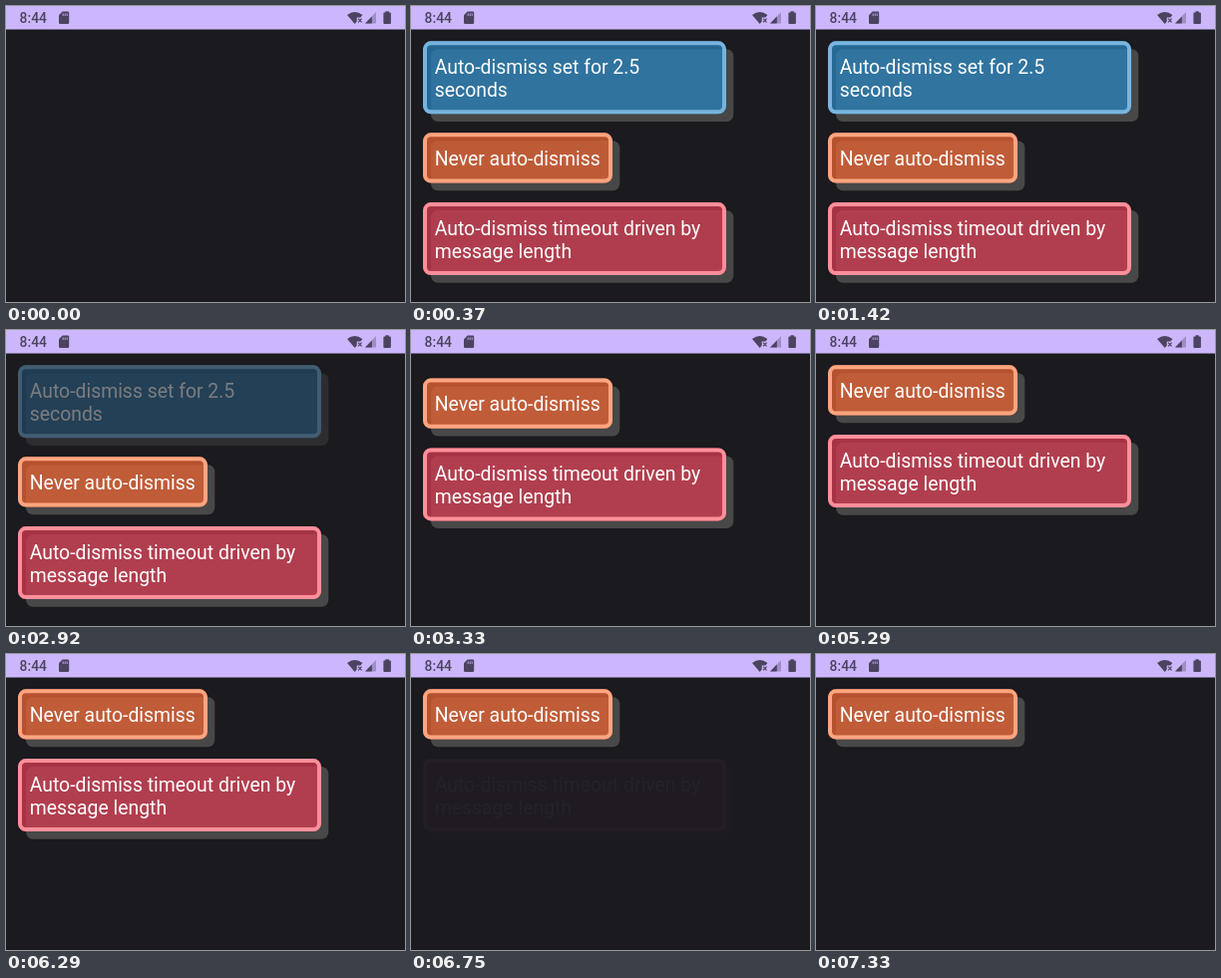
These frames come from a looping animation (400x297 px, 7420 ms). An HTML page:

```html
<!DOCTYPE html>
<html lang="en">
<head>
<meta charset="utf-8">
<title>Auto-dismissing toasts</title>
<style>
  html, body { margin: 0; width: 100%; height: 100%; overflow: hidden; background: #1a1a1f; }
  svg { display: block; width: 100%; height: 100%; }
  text { font-family: Roboto, sans-serif; }
</style>
</head>
<body>
<svg id="stage" viewBox="0 0 400 297">
  <rect width="400" height="297" fill="#1a1a1f"/>
  <g id="toasts"></g>
  <rect width="400" height="23.5" fill="#cdb7fc"/>
  <g fill="#4b4360">
    <text x="13.6" y="17" font-size="13.9" font-weight="500">8:44</text>
    <path d="M56.6 5.5H62a1.2 1.2 0 0 1 1.2 1.2V16.8A1.2 1.2 0 0 1 62 18H54.2A1.2 1.2 0 0 1 53 16.8V9.2Z"/>
    <path d="M57.2 7.4V10M59.2 7.4V10M61.2 7.4V10" stroke="#cdb7fc" stroke-width=".8"/>
    <path d="M342 9Q349.700 2.800 357.400 9L355.400 11.500H351.700V15.600L349.700 18Z"/>
    <path d="M353 12.600L356.600 16.400M356.600 12.600L353 16.400" stroke="#4b4360" stroke-width="1.200"/>
    <path d="M371 6V17.500H360Z" opacity=".35"/>
    <path d="M366.800 10.400V17.500H360Z"/>
    <path d="M380.500 6.500V5.200H383.800V6.500H385A.9 .9 0 0 1 385.900 7.400V17.100A.9 .9 0 0 1 385 18H379.300A.9 .9 0 0 1 378.400 17.100V7.400A.9 .9 0 0 1 379.300 6.500Z"/>
  </g>
</svg>
<script>
const LOOP = 7420;
const ENTER = 20;
const COLLAPSE = 3160;
const ROW_SHIFT = 92;
const LINE = 22.8;

const toasts = [
  { y: 35.3, width: 304, fill: '#2883bd', border: '#79b5df', leave: 2825, removed: COLLAPSE,
    lines: ['Auto-dismiss set for 2.5', 'seconds'] },
  { y: 127.3, width: 190, fill: '#e86333', border: '#ffa580', shifts: true,
    lines: ['Never auto-dismiss'] },
  { y: 197.1, width: 304, fill: '#d53b50', border: '#ff8f9a', leave: 6490, removed: 6850, shifts: true,
    lines: ['Auto-dismiss timeout driven by', 'message length'] }
];

function add(parent, tag, attrs, content = '') {
  const node = document.createElementNS('http://www.w3.org/2000/svg', tag);
  for (const key in attrs) node.setAttribute(key, attrs[key]);
  node.textContent = content;
  return parent.appendChild(node);
}

const layer = document.getElementById('toasts');
for (const toast of toasts) {
  const { width, fill, border, lines } = toast;
  const height = 27.4 + lines.length * LINE;
  const group = toast.group = add(layer, 'g', {});
  add(group, 'rect', { x: 20, y: 8, width: width - 0.7, height: height - 0.3, rx: 7, fill: '#484848' });
  // The translucent fill lets the offset shadow show through.
  add(group, 'rect', { x: 12, width, height, rx: 8, fill, 'fill-opacity': 0.75 });
  add(group, 'rect', { x: 14, y: 2, width: width - 4, height: height - 4, rx: 6,
    fill: 'none', stroke: border, 'stroke-width': 4 });
  lines.forEach((line, i) => add(group, 'text',
    { x: 23.7, y: 32.9 + i * LINE, 'font-size': 19.4, fill: '#fff' }, line));
}

// Remaining distance of a critically damped spring.
function spring(ms) {
  const x = Math.max(0, ms) * 0.02;
  return (1 + x) * Math.exp(-x);
}

function render(t) {
  for (const { group, y, leave = LOOP, removed = LOOP, shifts } of toasts) {
    const opacity = t >= removed ? 0 : (1 - spring(t - ENTER)) * spring(t - leave);
    const top = shifts ? y - ROW_SHIFT * (1 - spring(t - COLLAPSE)) : y;
    group.setAttribute('opacity', opacity.toFixed(4));
    group.setAttribute('transform', `translate(0 ${top.toFixed(3)})`);
  }
}

const start = performance.now();
function tick() {
  render((performance.now() - start) % LOOP);
  requestAnimationFrame(tick);
}
render(0);
tick();
</script>
</body>
</html>
```
